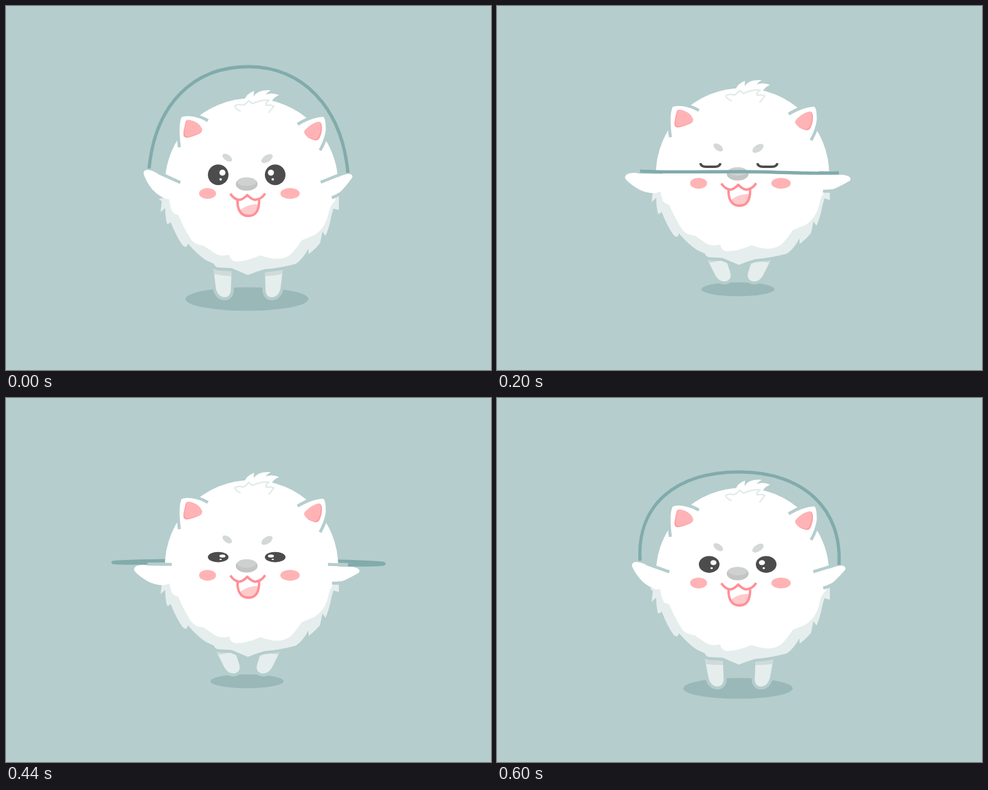
Recreate the animation shown at these times as an HTML page. Size 800x600 px, loop 0.64 s.

```html
<!DOCTYPE html>
<html lang="en">
<head>
<meta charset="utf-8">
<title>Skipping puppy</title>
<style>
  html, body { margin: 0; width: 100%; height: 100%; overflow: hidden; background: #b5cdcd; }
  svg { display: block; width: 100vw; height: 100vh; }
  .gap { stroke: #b5cdcd; stroke-width: 10; stroke-linejoin: round; paint-order: stroke; }
  .cut { fill: none; stroke: #b5cdcd; stroke-width: 5; }
  .rope { fill: none; stroke: #82abab; stroke-width: 5.4; }
  .white { fill: #fff; }
  .fur { fill: #e5eeed; }
  .pink { fill: #ffb3b5; }
  .rose { fill: #fb9fa6; }
  .lip { fill: none; stroke: #ff9097; stroke-width: 4; }
  .dark { fill: #4c4c4c; }
  .lid { fill: none; stroke: #4c4c4c; stroke-width: 4; }
  .brow { fill: #d4d9d8; }
</style>
</head>
<body>
<svg viewBox="0 0 800 600">
  <defs>
    <path id="leg" d="M341 412 L342.500 434 L346 464 C347.500 474 353 480 361 480 C368 480 371 474 371 466 L372 434 L372 412 Z"/>
    <path id="furShape" d="M262 300 L262 316 L252 318 L257 322 L255 340 L262.500 333 Q263 350 265.500 359 Q269 360 271.500 356
      Q281 380 291 394 Q296 399 298.500 396 L300 391.500 Q316 410 330 419 L343 425 Q345 431 352 431 L372 432 Q386 438 399 443.500
      Q412 438 426 434 Q452 432 478 425 Q489 418 499 400 L499 409 Q509 402 518 391 L522 372 L527 379 Q533 366 536.500 347
      L540 334 L549 336.500 L549 313 L540 318 L546 300 Z"/>
    <path id="coat" d="M262 295 A143 143 0 0 1 548 295 Q547 308 543 321 Q534 328 531 346 Q525 368 508 378 L488 386
      Q479 400 469 410 Q452 423 420 411 Q397 421 378 421 Q370 419 368 410 Q352 414 342 406 L326 395 Q313 394 306 386
      Q294 368 284 344 Q274 343 272 333 Q269 322 269.500 319 Q263 318 262 308 Z"/>
    <path id="earL" d="M286 233 C283 210 283 190 288 181 C300 176 320 181 333 189"/>
    <path id="earR" d="M481 195 C494 187 510 181 523 180 C529 181 530 192 530 205 C528 218 524 228 518 238"/>
    <path id="earInL" d="M296 192 Q297 187 303 188 Q318 191 323 202 Q325 208 318 211 Q304 217 297 217 Q291 216 293 206 Z"/>
    <path id="earInR" d="M492 209 Q491 206 496 202 Q505 193 515 191 Q520 190 521 197 Q522 208 517 218 Q514 223 508 221 Q496 218 492 209 Z"/>
    <path id="jaw" d="M382 319 C381 337 388 346 400 346 C412 346 418 337 417.500 319"/>
    <path id="lid" class="lid" d="M-16.500 -6 Q-15.500 -.3 -7 0 H7 Q15.500 -.3 16.500 -6"/>
    <clipPath id="clipL"><use href="#earInL"/></clipPath>
    <clipPath id="clipR"><use href="#earInR"/></clipPath>
    <clipPath id="clipJaw"><use href="#jaw"/></clipPath>
    <clipPath id="clipLeg"><use href="#leg"/></clipPath>
    <g id="legPart">
      <use href="#leg" class="fur gap"/>
      <path clip-path="url(#clipLeg)" fill="#cfdbdb" d="M335 405 H380 V446 Q355 445 335 440 Z"/>
    </g>
  </defs>

  <rect width="800" height="600" fill="#b5cdcd"/>
  <ellipse id="shadow" cx="397.500" fill="#9bb8b8"/>
  <path id="ropeBack" class="rope"/>

  <g id="dog">
    <use id="legL" href="#legPart"/>
    <g transform="translate(799 0) scale(-1 1)"><use id="legR" href="#legPart"/></g>

    <use href="#furShape" class="fur gap"/>
    <use href="#coat" class="white"/>

    <path class="white" d="M393 156 Q396 145 409 140 L408.500 149 Q416 137 437 139 Q431 142 428.500 146 Q439 142 450.500 147 Q441 150 437 160 Z"/>
    <path fill="none" stroke="#e1eceb" stroke-width="2.500" stroke-linejoin="round"
      d="M387 173.500 Q378 169 377.500 165 Q381 161 391 163.500 Q396 162 400 156 L406.500 161 Q421 154 434 155.500 Q427 160 429 164 Q436 162 442 165 L433 176"/>

    <use href="#earL" class="white"/>
    <use href="#earL" class="cut"/>
    <use href="#earInL" class="rose"/>
    <g clip-path="url(#clipL)"><use href="#earInL" class="pink" transform="translate(2 -2)"/></g>

    <use href="#earR" class="white"/>
    <use href="#earR" class="cut"/>
    <use href="#earInR" class="rose"/>
    <g clip-path="url(#clipR)"><use href="#earInR" class="pink" transform="translate(-2 -2)"/></g>

    <g id="armL">
      <path class="white" d="M288 294 L250 276 Q240 270 233 270 Q226 271 227 277 Q231 289 241 302 Q250 312 262 317.500 L290 320 Z"/>
      <path class="cut" d="M251 274.500 L287.500 291"/>
    </g>
    <g id="armR">
      <path class="white" d="M518 294 L548 282 Q558 277 566 276.500 Q573 278 571 283 Q564 293 554 304 Q548 310 538 313 L515 316 Z"/>
      <path class="cut" d="M519 290.500 L549 278.500 M537.500 316 Q544 314 551 309.500"/>
    </g>

    <ellipse class="brow" rx="9" ry="5" transform="translate(365 250) rotate(35)"/>
    <ellipse class="brow" rx="10.500" ry="5.600" transform="translate(430.500 251.500) rotate(-33)"/>

    <g id="eyes">
      <circle class="dark" cx="350" r="17"/>
      <circle class="dark" cx="444" r="17"/>
      <circle class="white" cx="357" cy="-3.500" r="5"/>
      <circle class="white" cx="437" cy="-3.500" r="5"/>
      <circle class="white" cx="354" cy="7.500" r="2"/>
      <circle class="white" cx="440" cy="7.500" r="2"/>
    </g>
    <g id="lids">
      <use href="#lid" x="352"/>
      <use href="#lid" x="446"/>
    </g>

    <ellipse class="pink" cx="332.500" cy="309" rx="14" ry="9"/>
    <ellipse class="pink" cx="468.500" cy="309" rx="16" ry="9"/>
    <ellipse cx="397" cy="293.500" rx="18" ry="11" fill="#c3c5c5"/>
    <ellipse cx="397" cy="289.700" rx="15.500" ry="7" fill="#cfd1d1"/>

    <use href="#jaw" class="white"/>
    <path clip-path="url(#clipJaw)" fill="#ffcacc" d="M380 343 Q394 325 420 327 V350 H380 Z"/>
    <use href="#jaw" class="lip"/>
    <path class="lip" stroke-linejoin="round" d="M370 309.500 Q377 319.500 385 319.500 Q391 319 398 311.500 Q405 319 411 319.500 Q421 319 427.500 309"/>
  </g>

  <path id="ropeFront" class="rope"/>
</svg>

<script>
const LOOP = 640, STEP = 40, HALF = LOOP / 2;
const { sin, cos, abs, min, max, floor, PI } = Math;
const $ = id => document.getElementById(id);
const set = (id, name, value) => $(id).setAttribute(name, value);

// Half a rope on each side of the middle; it swings with angle a
// and bulges outwards while it is behind the dog.
function ropePath(a) {
  const mid = 259 - 121 * cos(a) - 38 * cos(3 * a) + 9 * sin(a) + 6 * sin(2 * a) + 3.4 * sin(3 * a);
  const bulge = 26 - 71 * sin(a) - 36 * cos(a) + 20 * sin(2 * a);
  const steep = 0.42 + 0.21 * cos(a) + 0.365 * sin(a) - 0.2 * sin(2 * a);
  const pull = (mid - 270) * steep, flat = bulge + 100;
  const l = 236, r = 564, ly = 271 - 3 * cos(a), ry = 275;
  return `M${l} ${ly} C${l - bulge} ${ly + pull} ${400 - flat} ${mid} 400 ${mid}` +
    ` C${400 + flat} ${mid} ${r + bulge} ${ry + pull} ${r} ${ry}`;
}

function draw(t) {
  const a = 2 * PI * t / LOOP;
  const u = 1 - abs(1 - t / HALF);     // up and down again
  const rise = 1 - (1 - u) ** 2;
  const hop = max(0, 2 * u - 1);       // feet off the ground
  const y = -17.5 * rise - 7 * hop;

  set('dog', 'transform', `translate(0 ${y})`);
  const radius = 101.5 - 48 * rise;
  set('shadow', 'cy', 483 - 18.7 * rise);
  set('shadow', 'rx', radius);
  set('shadow', 'ry', radius * 0.191);

  const lift = -5 * u * u;
  set('armL', 'transform', `translate(${-lift} ${lift}) rotate(${-38 * u} 284 330)`);
  set('armR', 'transform', `translate(${lift} ${lift}) rotate(${38 * u} 520 325)`);
  for (const id of ['legL', 'legR'])
    set(id, 'transform', `translate(${4 * u} ${-24 * u ** 3}) rotate(${-32 * u} 357 433)`);

  // two blinks per loop
  const beat = (t % HALF) / STEP;
  const open = min(1, max(0, (abs(beat - 4.7) - 0.75) / 1.9));
  set('eyes', 'transform', `translate(0 ${278.2 - y * 0.05}) scale(1 ${open})`);
  set('eyes', 'visibility', open ? 'visible' : 'hidden');
  set('lids', 'transform', `translate(0 ${280.5 + 1.5 * sin(a)})`);
  set('lids', 'visibility', open ? 'hidden' : 'visible');

  const front = t < HALF;
  set('ropeFront', 'd', front ? ropePath(a) : '');
  set('ropeBack', 'd', front ? '' : ropePath(a));
}

const start = performance.now();
function tick() {
  const t = (performance.now() - start) % LOOP;
  draw(floor(t / STEP) * STEP);
  requestAnimationFrame(tick);
}
tick();
</script>
</body>
</html>
```
